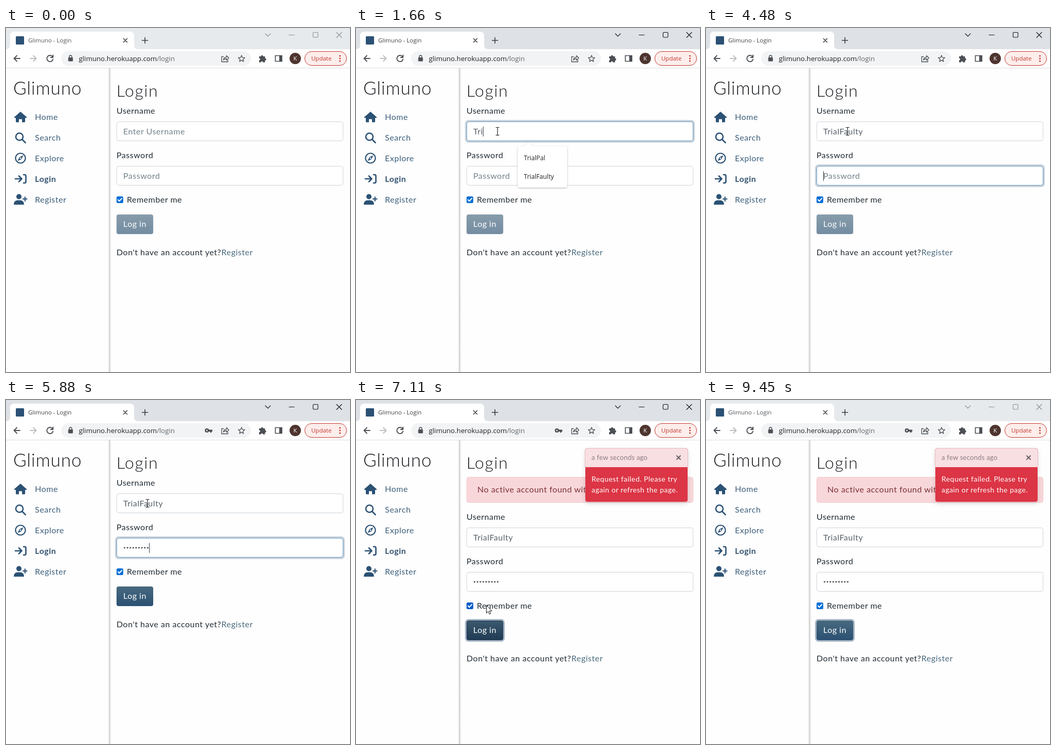
Write an HTML page that moves like this. It is 666 px wide and 666 px high and loops after 9520 ms.

```html
<!DOCTYPE html>
<html lang="en">
<head>
<meta charset="utf-8">
<title>Login demo</title>
<style>
  html, body { margin: 0; width: 100%; height: 100%; overflow: hidden; background: #fff; }
  svg { display: block; width: 100vw; height: 100vh; }
  text { font: 400 16px Lato, "Open Sans", sans-serif; letter-spacing: .5px; fill: #212b33; }
  .nav text { fill: #3d5f7b; }
  .nav .on { font-weight: 700; fill: #34536f; }
  .head { font-weight: 300; fill: #16191d; }
  .ui, .ui text { font-family: "Open Sans", "Noto Sans", sans-serif; letter-spacing: 0; }
  .hint { fill: #73828a; }
  .value { fill: #56616a; }
  .field { fill: #fff; stroke: #ced4da; }
  .focus { fill: none; }
  .line { fill: none; stroke-linecap: round; stroke-linejoin: round; }
  .small { font-size: 14px; letter-spacing: .45px; }
</style>
</head>
<body>
<svg viewBox="0 0 666 666" xmlns="http://www.w3.org/2000/svg">
  <defs>
    <linearGradient id="edge"><stop stop-color="#c9c9c9"/><stop offset="1" stop-color="#fefefe"/></linearGradient>
    <linearGradient id="calm" x2="0" y2="1"><stop stop-color="#48697f"/><stop offset="1" stop-color="#2b5072"/></linearGradient>
    <linearGradient id="deep" x2="0" y2="1"><stop stop-color="#3c596e"/><stop offset="1" stop-color="#203b54"/></linearGradient>
    <filter id="soft" x="-20%" y="-20%" width="140%" height="140%"><feDropShadow dx="0" dy="1" stdDeviation="1.5" flood-opacity=".3"/></filter>
    <filter id="wide" x="-20%" y="-20%" width="140%" height="140%"><feDropShadow dx="0" dy="3" stdDeviation="4" flood-opacity=".15"/></filter>
  </defs>
  <rect width="666" height="666" fill="#fefefe"/>

  <!-- browser chrome -->
  <g class="ui">
    <rect id="strip" width="666" height="41"/>
    <path d="M0 41Q8 41 8 33V15Q8 7 16 7H240Q248 7 248 15V33Q248 41 256 41V77H0Z" fill="#fff"/>
    <rect y="41" width="666" height="36" fill="#fff"/>
    <rect y="77" width="666" height="1" fill="#dcdee1"/>
    <rect x="19" y="16" width="16" height="16" rx="1.5" fill="#2b5174"/>
    <text id="tab" x="43" y="28" style="font-size:11.4px">Glimuno - Login</text>
    <g class="line" stroke="#3c4043" stroke-width="1.6">
      <path d="M227.5 20.5l7 7m0-7l-7 7M263.500 24h11m-5.500-5.500v11"/>
    </g>
    <g id="win" class="line" stroke-width="1.1">
      <path d="M502 11l5 5 5-5M548 13.500h10M640 8.500l10 10m0-10l-10 10"/>
      <rect x="594.500" y="8.500" width="9.500" height="9.500" rx="1.500"/>
    </g>
    <g class="line" stroke-width="1.900" stroke="#4b4f54">
      <path d="M27 59H15.500m5.500-5.500l-5.500 5.500 5.500 5.500"/>
      <path d="M47 59h11.500m-5.500-5.500l5.500 5.500-5.500 5.500" stroke="#bcbec1"/>
      <path d="M90 55.500a6 6 0 1 0 1 5M91 52.500v4.500h-4.500"/>
    </g>
    <rect x="107" y="45" width="367" height="28" rx="14" fill="#f1f3f4"/>
    <rect x="120.500" y="57" width="9" height="7.500" rx="1" fill="#4b4f54"/>
    <path class="line" d="M122.500 57v-1.500a2.500 2.500 0 0 1 5 0v1.500" stroke="#4b4f54" stroke-width="1.400"/>
    <text x="141" y="64" style="font-size:13.200px;fill:#202124">glimuno.herokuapp.com<tspan fill="#62666b">/login</tspan></text>
    <g id="key" fill="#4b4f54">
      <path d="M391 57.500h8.500v3.500h-1.500v2h-3v-2h-4z"/>
      <circle cx="389" cy="59" r="2.800" fill="none" stroke="#4b4f54" stroke-width="2.500"/>
    </g>
    <g class="line" stroke="#4b4f54" stroke-width="1.300">
      <path d="M421 55.500h-3.500v10h12v-3M421 62q.5-5.500 6-5.500v-3l4.500 4.500-4.500 4.500v-3q-4 0-6 2.500Z"/>
      <path id="star"/>
    </g>
    <path d="M490 55h3.500a2.200 2.200 0 0 1 4.400 0h3.600v3.500a2.200 2.200 0 0 1 0 4.500v3.500h-4a2 2 0 0 0-4 0h-3.500v-4a2 2 0 0 0 0-4z" fill="#4b4f54"/>
    <path d="M521.500 53.500h12.500v11h-12.500z" fill="none" stroke="#4b4f54" stroke-width="1.700"/>
    <path d="M529 53h5.500v12h-5.500z" fill="#4b4f54"/>
    <circle cx="560" cy="59" r="11" fill="#4e342e"/>
    <text x="560" y="63" text-anchor="middle" style="font-size:11px;fill:#fff">K</text>
    <rect x="578.500" y="45.500" width="81" height="27" rx="13.500" fill="#fdeeec" stroke="#c5362c"/>
    <text x="591" y="63" style="font-size:11.500px;fill:#c5362c">Update</text>
    <g fill="#c5362c"><circle cx="646.500" cy="54" r="1.500"/><circle cx="646.500" cy="59" r="1.500"/><circle cx="646.500" cy="64" r="1.500"/></g>
  </g>

  <!-- sidebar -->
  <rect x="199" y="78" width="5" height="588" fill="url(#edge)"/>
  <text class="head" x="14" y="129" style="font-size:35px;letter-spacing:.8px">Glimuno</text>
  <g class="nav">
    <text x="56" y="178">Home</text>
    <text x="56" y="218">Search</text>
    <text x="56" y="258">Explore</text>
    <text x="56" y="298" class="on">Login</text>
    <text x="56" y="338">Register</text>
    <g fill="#2b5174">
      <path d="M28 162l12 10.500q.5 1.500-1 1.500h-2v7q0 1.500-1.500 1.500h-4.500v-6h-6v6h-4.500q-1.500 0-1.500-1.500v-7h-2q-1.500 0-1-1.500z"/>
      <path d="M33.500 246.500l-3.500 7.500-7.500 3.500 3.500-7.500zM28 250.500a1.500 1.500 0 1 0 .1 0z" fill-rule="evenodd"/>
      <circle cx="25" cy="326.500" r="5"/>
      <path d="M15 342q0-8.500 8-8.500h4q8 0 8 8.500z"/>
    </g>
    <g class="line" stroke="#2b5174" stroke-width="2.600">
      <circle cx="26" cy="210.500" r="7"/><path d="M31.500 216l6 6"/>
      <circle cx="28" cy="252" r="9.500" stroke-width="2.200"/>
      <path d="M18 292h12m-5-5.500l5.500 5.500-5.500 5.500M34 284h2q2.500 0 2.500 2.500v11q0 2.500-2.500 2.500h-2"/>
      <path d="M33 331h7.500m-3.700-3.700v7.500" stroke-width="2.200"/>
    </g>
  </g>

  <!-- page -->
  <text class="head" x="214" y="133" style="font-size:32px;letter-spacing:1.500px">Login</text>
  <g id="alert">
    <rect x="214.500" y="149.500" width="438" height="49" rx="4" fill="#f8d7da" stroke="#f5c6cb"/>
    <text x="235" y="179" style="fill:#7c3038">No active account found with the given credentials</text>
  </g>
  <g id="form">
    <text x="214" y="166">Username</text>
    <rect class="field" x="214.500" y="181.500" width="438" height="37" rx="4"/>
    <g id="userRing" class="focus"></g>
    <text id="userHint" class="hint" x="227" y="206">Enter Username</text>
    <text id="user" class="value" x="227" y="206"></text>
    <text x="214" y="252">Password</text>
    <rect class="field" x="214.500" y="267.500" width="438" height="37" rx="4"/>
    <g id="passRing" class="focus"></g>
    <text id="passHint" class="hint" x="227" y="292">Password</text>
    <g id="dots" fill="#495057"></g>
    <rect id="caret" width="1" height="19" fill="#30363b"/>
    <rect id="check" x="214" y="326" width="13" height="13" rx="2.500"/>
    <path class="line" d="M217 332.500l2.500 2.700 4.700-5.400" stroke="#fff" stroke-width="2"/>
    <text x="234" y="338">Remember me</text>
    <rect id="btnRing" x="212.500" y="359.500" width="74" height="41" rx="5.500" fill="none" stroke="#a9b8c6" stroke-width="3"/>
    <g id="btn">
      <rect x="214" y="361" width="71" height="38" rx="4" fill="url(#calm)"/>
      <rect id="btnDeep" x="214.500" y="361.500" width="70" height="37" rx="4" fill="url(#deep)" stroke="#1f3a54"/>
      <text x="227" y="385" style="fill:#fff">Log in</text>
    </g>
    <text x="214" y="440">Don't have an account yet?</text>
    <text x="417" y="440" style="fill:#4a6a7e">Register</text>
  </g>
  <g id="toast">
    <rect x="444" y="94" width="198" height="103" rx="4" fill="#dc3545" filter="url(#wide)"/>
    <path d="M444 130V98q0-4 4-4h190q4 0 4 4v32z" fill="#f8dfe2"/>
    <path d="M443.500 130V98q0-4.500 4.500-4.500h190q4.500 0 4.500 4.500v32" fill="none" stroke="#e9b9be"/>
    <text class="small" x="456" y="116" style="font-size:13px;letter-spacing:.25px;fill:#8a7b80">a few seconds ago</text>
    <path class="line" d="M621 108l7 7m0-7l-7 7" stroke="#6c5f64" stroke-width="2"/>
    <g font-weight="600">
      <text class="small" x="456" y="158" style="fill:#fff">Request failed. Please try</text>
      <text class="small" x="456" y="179" style="fill:#fff">again or refresh the page.</text>
    </g>
  </g>
  <g id="popup" class="ui">
    <g filter="url(#soft)">
      <rect id="sheet" x="313" y="229" rx="4" fill="#fff"/>
      <path d="M326.500 229.500l8-8 8 8z" fill="#fff"/>
    </g>
    <g id="items"></g>
  </g>

  <!-- pointer -->
  <circle id="glow" r="11.500" fill="#f8ee2e" fill-opacity=".8"/>
  <g id="pointer">
    <path id="beam" class="line" d="M-3 -7.500h2q1 0 1 1v13q0 1-1 1h-2M3 -7.500h-2q-1 0-1 1M3 7.500h-2q-1 0-1-1" stroke="#111" stroke-width="1.100"/>
    <path id="arrow" d="M.5 .5V15.500l3.500-3.200 2.400 5.400 2.400-1-2.400-5.300h4.600z" fill="#fff" stroke="#111"/>
    <path id="hand" d="M-1.500 11V1.500q1.500-2 3 0V7q1.500-1.500 2.800 0 1.600-1 2.700.5 2-.8 2.500 1V14q0 3-2 6H0q-1-3-5-7-1.500-2 .5-2.800 1.500 0 3 .8z" fill="#fff" stroke="#111"/>
  </g>
</svg>
<script>
const $ = id => document.getElementById(id);
const NS = 'http://www.w3.org/2000/svg';
const LOOP = 9520;
const NAME = 'TrialFaulty';
const NAME_KEYS = [1260, 1480, 1660, 1930, 2190, 2390, 2590, 2720, 2850, 2990, 3060];
const PASS_KEYS = [4550, 4950, 5150, 5280, 5610, 5680, 5740, 5810, 5880];
const ACTIVE = 810, TAB = 3400, CLICK = 6570, FAIL = 7110, LEAVE = 9450;

const LISTS = [
  { width: 156, names: ['a', 'Ben', 'TrialPal', 'PortChap', 'RainyNook', 'PaddleAcrossLakes'] },
  { width: 118, names: ['TrialPal', NAME, 'TrekFarNorth'] },
  { width: 96, names: ['TrialPal', NAME] },
  { width: 96, names: [NAME] }
];

// start, end, from, to
const MOVES = [
  [130, 600, 610, 650, 274, 200],
  [5940, 6500, 274, 200, 252, 397],
  [8100, 9050, 252, 397, 628, 655]
];

const ramp = (t, a, b) => Math.min(1, Math.max(0, (t - a) / (b - a)));
const ease = k => k * k * (3 - 2 * k);
const within = (t, a, b) => t >= a && t < b;
const typed = (t, keys) => keys.filter(k => t >= k).length;
const show = (id, on) => { $(id).style.display = on ? '' : 'none'; };

function set(el, attrs) {
  for (const name in attrs) el.setAttribute(name, attrs[name]);
  return el;
}

function add(parent, tag, attrs) {
  return parent.appendChild(set(document.createElementNS(NS, tag), attrs));
}

function buildRing(id, y) {
  add($(id), 'rect', { x: 212.5, y: y - 1.5, width: 442, height: 41, rx: 5.5, stroke: '#c8d3dd', 'stroke-width': 3 });
  add($(id), 'rect', { x: 214.5, y: y + .5, width: 438, height: 37, rx: 4, stroke: '#6595bd' });
}

buildRing('userRing', 181);
buildRing('passRing', 267);
PASS_KEYS.forEach((_, i) => add($('dots'), 'circle', { cx: 229.5 + 5.6 * i, cy: 286, r: 1.6 }));
set($('star'), {
  d: 'M' + Array.from({ length: 10 }, (_, i) => {
    const r = i % 2 ? 2.9 : 6.6, a = i * Math.PI / 5;
    return `${456 + r * Math.sin(a)} ${59.5 - r * Math.cos(a)}`;
  }).join('L') + 'Z'
});

let shownList = null;
function fillPopup(list) {
  if (list === shownList) return;
  shownList = list;
  set($('sheet'), { width: list.width, height: 36 * list.names.length + 8 });
  $('items').replaceChildren();
  list.names.forEach((name, i) => {
    const row = add($('items'), 'text', { x: 325, y: 256 + 36 * i, style: 'font-size:12.2px;fill:#202124' });
    row.textContent = name;
  });
}

function drawPointer(t) {
  const move = MOVES.filter(m => t >= m[0]).pop();
  show('pointer', move && t < 9120);
  if (!move) return;
  const [a, b, x0, y0, x1, y1] = move;
  const k = ease(ramp(t, a, b));
  const x = x0 + (x1 - x0) * k, y = y0 + (y1 - y0) * k;
  set($('pointer'), { transform: `translate(${x} ${y})` });
  const early = t < FAIL;
  const beam = early && (within(y, 181, 219) || within(y, 267, 305));
  const hand = early && x < 285 && within(y, 361, 399);
  show('beam', beam);
  show('hand', hand);
  show('arrow', !beam && !hand);
}

function drawForm(t) {
  const n = typed(t, NAME_KEYS), p = typed(t, PASS_KEYS);
  const tab = ramp(t, TAB, TAB + 150), click = ramp(t, CLICK, CLICK + 140);
  const failed = t >= FAIL;

  set($('form'), { transform: `translate(0 ${failed ? 66 : 0})` });
  show('alert', failed);
  show('toast', failed);

  $('user').textContent = NAME.slice(0, n);
  show('userHint', !n);
  show('passHint', !p);
  show('key', p);
  [...$('dots').children].forEach((dot, i) => { dot.style.display = i < p ? '' : 'none'; });

  set($('userRing'), { opacity: ramp(t, 860, 1000) * (1 - tab) });
  set($('passRing'), { opacity: tab * (1 - click) });
  set($('btnRing'), { opacity: click });
  set($('btnDeep'), { opacity: t < LEAVE ? click : 0 });
  set($('btn'), { opacity: p ? 1 : .65 });
  set($('check'), { fill: within(t, FAIL, 8160) ? '#005cc8' : '#0b70d8' });

  const inUser = t < TAB;
  const userEnd = n ? $('user').getComputedTextLength() : 0;
  set($('caret'), {
    x: inUser ? 227 + userEnd : 227 + (p ? 5.6 * p - .4 : 0),
    y: inUser ? 191 : 277
  });
  show('caret', within(t, ACTIVE, CLICK) && !within(t, 3950, 4480));

  show('popup', within(t, ACTIVE, TAB));
  fillPopup(LISTS[n < 1 ? 0 : n < 3 ? 1 : n < 5 ? 2 : 3]);
}

function draw(t) {
  const active = within(t, ACTIVE, LEAVE);
  set($('strip'), { fill: active ? '#dee1e6' : '#e7eaed' });
  set($('win'), { stroke: active ? '#111' : '#8b8d90' });
  $('tab').style.fill = active ? '#3c4043' : '#50555a';
  drawForm(t);
  const first = within(t, ACTIVE, 1000), second = within(t, CLICK, 6710);
  show('glow', first || second);
  set($('glow'), first ? { cx: 272, cy: 200 } : { cx: 252, cy: 397 });
  drawPointer(t);
}

const start = performance.now();
function frame() {
  draw((performance.now() - start) % LOOP);
  requestAnimationFrame(frame);
}
draw(0);
requestAnimationFrame(frame);
</script>
</body>
</html>
```
